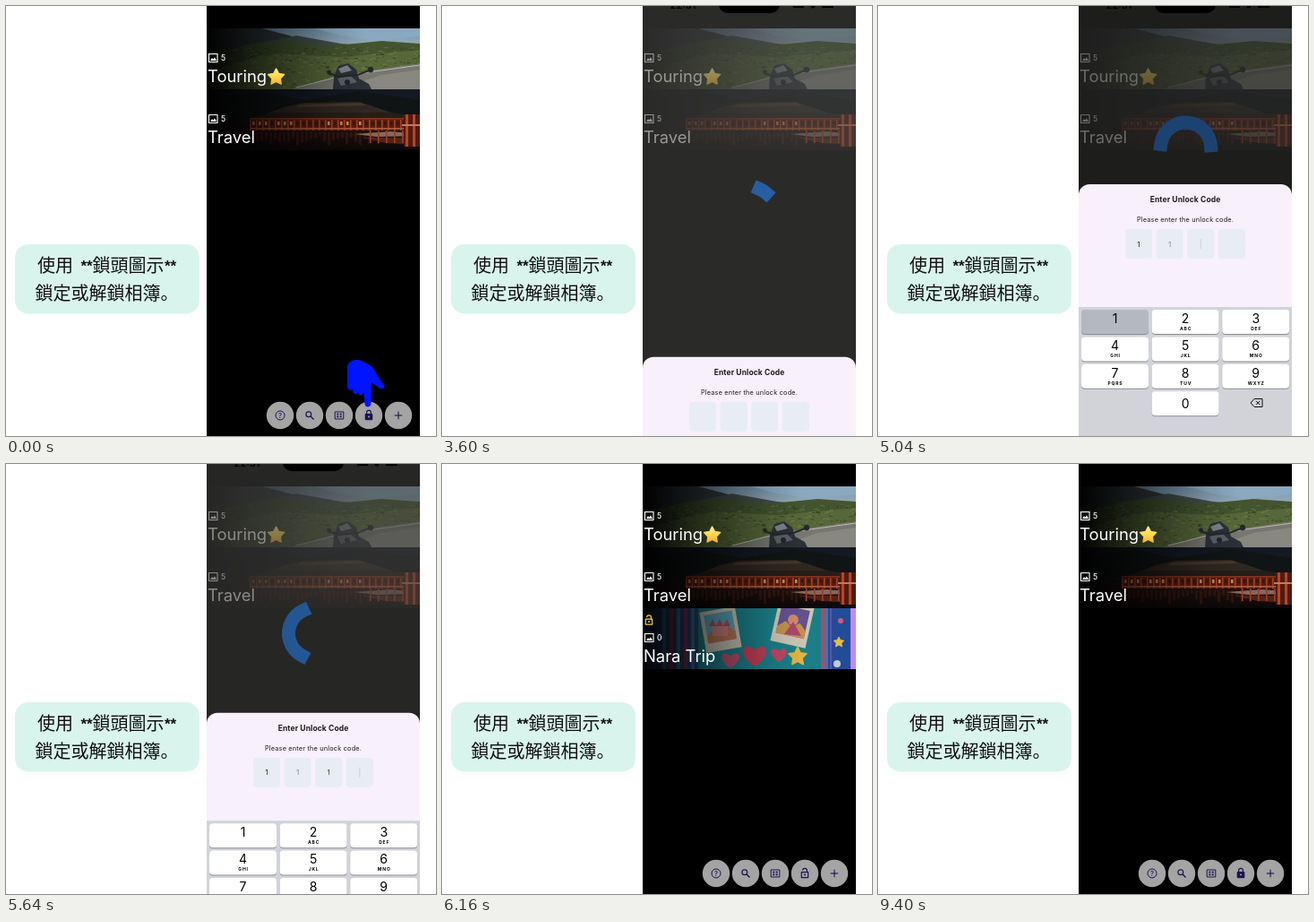
An HTML page with a canvas that plays this animation: 480x480 px, repeating every 9880 ms.

```html
<!DOCTYPE html>
<html lang="zh-Hant">
<head>
<meta charset="utf-8">
<title>Album lock</title>
<style>
html, body { margin: 0; width: 100%; height: 100%; overflow: hidden; background: #fff; }
canvas { display: block; width: 480px; height: 480px; }
</style>
</head>
<body>
<canvas id="stage" lang="ja" width="480" height="480"></canvas>
<script>
const ctx = document.getElementById('stage').getContext('2d');
const LOOP = 9880;
const UI = 'Inter, "Liberation Sans", sans-serif';
const CJK = '"Noto Sans CJK JP", "Noto Sans CJK SC", "Noto Sans CJK", sans-serif';
const L = 224, W = 238, ROW = 68, INK = '#1c1450';

const clamp = v => Math.max(0, Math.min(1, v));
const span = (t, from, len) => clamp((t - from) / len);

function fastOutSlowIn(x) {
  let lo = 0, hi = 1;
  for (let i = 0; i < 20; i++) {
    const m = (lo + hi) / 2, n = 1 - m;
    if (3 * n * n * m * 0.4 + 3 * n * m * m * 0.2 + m * m * m < x) lo = m; else hi = m;
  }
  return 3 * (1 - lo) * lo * lo + lo * lo * lo;
}

function random(seed) {
  return () => (seed = (seed * 16807) % 2147483647) / 2147483647;
}

function rect(c, x, y, w, h, color) {
  c.fillStyle = color;
  c.fillRect(x, y, w, h);
}

function round(c, x, y, w, h, r, color) {
  c.beginPath();
  c.roundRect(x, y, w, h, r);
  c.fillStyle = color;
  c.fill();
}

function disc(c, x, y, r, color) {
  c.beginPath();
  c.arc(x, y, r, 0, Math.PI * 2);
  c.fillStyle = color;
  c.fill();
}

function poly(c, color, ...p) {
  c.beginPath();
  for (let i = 0; i < p.length; i += 2) c.lineTo(p[i], p[i + 1]);
  c.closePath();
  c.fillStyle = color;
  c.fill();
}

function line(c, color, width, ...p) {
  c.beginPath();
  for (let i = 0; i < p.length; i += 2) c.lineTo(p[i], p[i + 1]);
  c.strokeStyle = color;
  c.lineWidth = width;
  c.stroke();
}

function text(str, x, y, font, color, align = 'left', spacing = 0) {
  ctx.font = font;
  ctx.fillStyle = color;
  ctx.textAlign = align;
  ctx.letterSpacing = spacing + 'px';
  ctx.fillText(str, x, y);
}

function star(c, x, y, r, color, inner = 0.5) {
  c.beginPath();
  for (let i = 0; i < 10; i++) {
    const a = i * Math.PI / 5 - Math.PI / 2, d = i % 2 ? r * inner : r;
    c.lineTo(x + d * Math.cos(a), y + d * Math.sin(a));
  }
  c.closePath();
  c.fillStyle = c.strokeStyle = color;
  c.lineJoin = 'round';
  c.lineWidth = r * 0.16;
  c.fill();
  c.stroke();
}

function heart(c, x, y, s, color) {
  c.beginPath();
  c.moveTo(x, y + s);
  c.bezierCurveTo(x - s * 2, y - s * 0.3, x - s * 0.8, y - s * 1.5, x, y - s * 0.5);
  c.bezierCurveTo(x + s * 0.8, y - s * 1.5, x + s * 2, y - s * 0.3, x, y + s);
  c.fillStyle = color;
  c.fill();
}

function fade(c, horizontal, stops) {
  const g = c.createLinearGradient(0, 0, horizontal ? W : 0, horizontal ? 0 : ROW);
  stops.forEach(([at, color]) => g.addColorStop(at, color));
  return g;
}

function photo(paint, shade) {
  const cv = document.createElement('canvas');
  cv.width = W;
  cv.height = ROW;
  const c = cv.getContext('2d');
  paint(c);
  rect(c, 0, 0, W, ROW, fade(c, true, shade));
  return cv;
}

function paintTouring(c) {
  const rnd = random(7);
  rect(c, 0, 0, W, ROW, fade(c, false, [[0, '#7596b0'], [0.35, '#9fb0ba']]));
  poly(c, '#8aa9c0', 120, 0, 238, 0, 238, 9, 190, 14, 150, 8);
  poly(c, '#343d41', 0, 0, 62, 0, 96, 9, 130, 17, 170, 22, 0, 34);
  poly(c, '#434f4a', 60, 16, 100, 8, 150, 17, 200, 22, 60, 30);
  poly(c, '#43552f', 0, 30, 50, 17, 90, 14, 130, 20, 165, 17, 195, 14, 238, 17, 238, 68, 0, 68);
  poly(c, '#566739', 0, 46, 80, 28, 150, 32, 238, 24, 238, 68, 0, 68);
  for (let i = 0; i < 420; i++) {
    const x = rnd() * W, y = 20 + rnd() * 46;
    rect(c, x, y, 1 + rnd() * 4, 1.2, rnd() < 0.5 ? 'rgba(28,44,20,.42)' : 'rgba(138,150,88,.35)');
  }
  poly(c, '#777770', 95, 68, 138, 56, 190, 46, 238, 39, 238, 68);
  poly(c, '#888780', 150, 68, 195, 52, 238, 46, 238, 68);
  line(c, '#b9b9af', 1, 100, 66, 150, 53, 238, 41);
  poly(c, '#2c3137', 141, 68, 142, 54, 147, 42, 158, 39, 167, 46, 170, 56, 181, 62, 184, 68);
  poly(c, '#7c858b', 147, 45, 157, 41, 162, 47, 150, 50);
  poly(c, '#596168', 146, 56, 160, 52, 168, 60, 150, 64);
  line(c, '#23282d', 2, 136, 50, 148, 54, 168, 52, 184, 46);
  disc(c, 136.5, 49, 2.4, '#23282d');
  disc(c, 183, 46, 3.2, '#23282d');
  disc(c, 157, 60, 3, '#20252a');
}

function paintTravel(c) {
  const rnd = random(23);
  rect(c, 0, 0, W, ROW, fade(c, false, [[0, '#131823'], [0.3, '#181b21'], [0.7, '#1b100d'], [1, '#0c0808']]));
  poly(c, '#101415', 0, 14, 60, 2, 110, 12, 170, 2, 238, 12, 238, 32, 0, 34);
  poly(c, '#2f2721', 66, 28, 86, 20, 108, 15, 170, 14, 186, 19, 212, 28);
  poly(c, '#463828', 104, 17, 172, 15, 178, 18, 100, 20);
  poly(c, '#261d18', 50, 32, 76, 26, 205, 26, 238, 30, 238, 34, 50, 36);
  rect(c, 48, 33, 190, 13, '#551d11');
  rect(c, 48, 32, 190, 1.5, '#843820');
  for (let x = 48; x < W; x += 7) {
    rect(c, x, 34, 1.6, 12, '#aa3d1f');
    rect(c, x + 3, 36, 2.5, 4, rnd() < 0.4 ? '#c98b5a' : '#35170f');
  }
  rect(c, 48, 43, 190, 1.6, '#b35d3c');
  for (let x = 20; x < 200; x += 5) rect(c, x, 48, 3, 3 + rnd() * 12, 'rgba(100,34,20,.35)');
  poly(c, '#84695b', 165, 50, 205, 47, 238, 50, 238, 52, 190, 53);
  poly(c, '#512317', 175, 54, 238, 54, 238, 62, 200, 60);
  for (let x = 182; x < W; x += 9) rect(c, x, 46, 1.6, 14, '#a03d23');
  rect(c, 220, 28, 18, 36, '#4c1d14');
  for (let x = 222; x < W; x += 8) rect(c, x, 28, 3, 36, '#bb4326');
  rect(c, 218, 39, 20, 2, '#c57a56');
}

function polaroid(c, x, y, angle, sky, land) {
  c.save();
  c.translate(x, y);
  c.rotate(angle);
  rect(c, -20, -23, 40, 46, '#c9c5b6');
  rect(c, -16, -19, 32, 32, sky);
  poly(c, land, -16, 13, -16, 5, -8, -2, 0, 3, 8, -3, 16, 4, 16, 13);
  c.restore();
}

function paintNara(c) {
  rect(c, 0, 0, W, ROW, '#176f7c');
  rect(c, 0, 0, 62, ROW, '#25446f');
  for (let i = 0; i < 5; i++) rect(c, 22 + i * 8, 0, 4, ROW, i % 2 ? '#7d3358' : '#3b6e9c');
  rect(c, 62, 0, 142, ROW, '#1b7e88');
  polaroid(c, 87, 24, -0.17, '#5ba5bd', '#b97752');
  rect(c, 78, 20, 17, 11, '#cf7f80');
  [78, 86, 94].forEach(x => poly(c, '#b84c5c', x - 4, 20, x, 12, x + 4, 20));
  polaroid(c, 167, 18, 0.22, '#62518f', '#c4914c');
  disc(c, 168, 13, 6, '#cf8a6d');
  poly(c, '#ad4767', 158, 29, 168, 15, 177, 31);
  heart(c, 125, 53, 12, '#c23d55');
  heart(c, 98, 58, 9, '#b9506f');
  heart(c, 152, 52, 8, '#c04664');
  star(c, 173, 54, 10.5, '#e3b340');
  rect(c, 199, 0, 4, ROW, '#bd4364');
  rect(c, 203, 0, 4, ROW, '#3778b0');
  rect(c, 207, 0, 25, ROW, '#234c98');
  rect(c, 209, 0, 2, ROW, '#704da5');
  star(c, 219, 38, 6, '#e8bd3f');
  disc(c, 221, 14, 3, '#d05a78');
  disc(c, 217, 62, 4, '#c1cad5');
  rect(c, 232, 0, 6, ROW, '#c58be8');
}

const darkLeft = [[0, 'rgba(0,0,0,.98)'], [0.2, 'rgba(0,0,0,.66)'], [0.6, 'rgba(0,0,0,.12)'], [0.75, 'rgba(0,0,0,0)']];
const touring = photo(paintTouring, darkLeft);
const travel = photo(paintTravel, darkLeft);
const nara = photo(paintNara, [[0, 'rgba(0,0,0,.95)'], [0.2, 'rgba(0,0,0,.62)'], [0.6, 'rgba(0,0,0,.1)'], [0.75, 'rgba(0,0,0,0)']]);

function padlock(x, y, color, open) {
  ctx.strokeStyle = color;
  ctx.lineWidth = 1.2;
  ctx.beginPath();
  if (open) ctx.moveTo(x - 2.4, y - 3.2);
  else ctx.moveTo(x - 2.4, y - 1);
  ctx.arc(x, y - 3.2, 2.4, Math.PI, 0);
  ctx.lineTo(x + 2.4, y - 1);
  ctx.stroke();
  if (open) {
    ctx.strokeRect(x - 3.7, y - 1.4, 7.4, 6);
  } else {
    round(ctx, x - 4.3, y - 2, 8.6, 7.2, 1, color);
  }
  disc(ctx, x, y + 1.6, 1, open ? color : '#a4a4a4');
}

function albumRow(img, top, title, count) {
  ctx.drawImage(img, L, top);
  ctx.strokeStyle = '#fff';
  ctx.lineWidth = 1.1;
  ctx.strokeRect(226.5, top + 28.5, 9.5, 9);
  poly(ctx, '#fff', 228, top + 36, 230, top + 33, 231.3, top + 34.6, 233, top + 32.2, 235, top + 36);
  text(count, 240, top + 36, '500 8.5px ' + UI, '#fff');
  text(title, 225, top + 60, '18.4px ' + UI, '#fff');
}

function buttons(y, unlocked) {
  for (let i = 0; i < 5; i++) disc(ctx, 306 + 33 * i, y, 15.2, '#a4a4a4');
  ctx.strokeStyle = INK;
  ctx.lineWidth = 1;
  ctx.beginPath();
  ctx.arc(306, y, 5, 0, 7);
  ctx.stroke();
  text('?', 306, y + 2.8, '500 7.5px ' + UI, INK, 'center');
  ctx.lineWidth = 1.2;
  ctx.beginPath();
  ctx.arc(337.8, y - 1.2, 2.9, 0, 7);
  ctx.stroke();
  line(ctx, INK, 1.4, 340, y + 1, 343.5, y + 4.5);
  ctx.lineWidth = 1;
  ctx.strokeRect(367.2, y - 4, 9.6, 8);
  for (const dx of [-2.7, 0.7]) for (const dy of [-2.3, 0.5]) rect(ctx, 372 + dx, y + dy, 2, 1.8, INK);
  ctx.globalAlpha = 1 - unlocked;
  padlock(405, y, INK, false);
  ctx.globalAlpha = unlocked;
  padlock(405, y, INK, true);
  ctx.globalAlpha = 1;
  line(ctx, INK, 1.1, 433.8, y, 442.2, y);
  line(ctx, INK, 1.1, 438, y - 4.2, 438, y + 4.2);
}

function home(buttonY, unlocked) {
  rect(ctx, L, 0, W, 480, '#000');
  albumRow(touring, 25, 'Touring', '5');
  const gold = ctx.createLinearGradient(0, 69, 0, 89);
  gold.addColorStop(0, '#fff0a0');
  gold.addColorStop(0.5, '#ffd84a');
  gold.addColorStop(1, '#f5a52c');
  star(ctx, 301.6, 79.5, 9.4, gold, 0.52);
  albumRow(travel, 93, 'Travel', '5');
  if (unlocked) {
    ctx.globalAlpha = unlocked;
    albumRow(nara, 161, 'Nara Trip', '0');
    padlock(231, 174.5, '#f5d033', true);
    ctx.globalAlpha = 1;
  }
  buttons(buttonY, unlocked);
}

function hand(scale) {
  ctx.save();
  ctx.translate(401.5, 421);
  ctx.scale(scale, scale);
  ctx.translate(-401.5, -421);
  ctx.beginPath();
  ctx.moveTo(381, 402);
  ctx.bezierCurveTo(383, 394, 394, 393, 401, 398);
  ctx.bezierCurveTo(409, 402, 412, 406, 414, 412);
  ctx.lineTo(422, 423);
  ctx.bezierCurveTo(424, 427, 419, 429, 416, 426);
  ctx.lineTo(408, 420);
  ctx.lineTo(407.5, 443);
  ctx.bezierCurveTo(407.5, 449, 400.5, 449, 400.3, 443);
  ctx.lineTo(399.5, 431);
  ctx.bezierCurveTo(398, 436, 393, 435, 393, 431);
  ctx.bezierCurveTo(391, 435, 386, 433, 387, 428);
  ctx.bezierCurveTo(383, 430, 380, 427, 381, 422);
  ctx.closePath();
  ctx.fillStyle = '#0014ff';
  ctx.fill();
  ctx.restore();
}

function spinner(t, cy) {
  const T = t < 4120 ? Math.max(0, t - 3500) : 620 + (t - 4120) * 1.066;
  const p = T / 1333 % 1;
  const head = fastOutSlowIn(clamp(p * 2)), tail = fastOutSlowIn(clamp(p * 2 - 1));
  const start = Math.PI * (-0.5 + tail * 1.5 + T / 2222 * 2 + p * 0.5);
  const sweep = Math.max(0.001, (head - tail) * 1.5 * Math.PI);
  ctx.beginPath();
  ctx.arc(343.5, cy, 28, start, start + sweep);
  ctx.lineCap = 'square';
  ctx.lineWidth = 15;
  ctx.strokeStyle = '#3d90f8';
  ctx.stroke();
  ctx.lineCap = 'butt';
}

function statusBar() {
  text('22:31', 269, 2.5, '600 11px ' + UI, '#000', 'center');
  round(ctx, 309, -12, 68, 20, 10, '#000');
  rect(ctx, 392, 0, 12, 2, '#000');
  disc(ctx, 414, 0, 2.5, '#000');
  rect(ctx, 424, 0, 13, 2, '#000');
}

const typedAt = [4520, 4800, 5080];
const digitAlpha = [1, 0.5, 0.85];

function sheet(t, top) {
  round(ctx, L, top, W, 500, [12, 12, 0, 0], '#f8f0fa');
  text('Enter Unlock Code', 343, top + 20, '700 8.5px ' + UI, '#1d1b20', 'center', 0.1);
  text('Please enter the unlock code.', 343, top + 42, '7.3px ' + UI, '#1d1b20', 'center', 0.2);
  const typed = typedAt.filter(at => t >= at).length;
  for (let i = 0; i < 4; i++) {
    const x = 276 + 34.6 * i;
    round(ctx, x, top + 50, 30, 33, 4, '#e8edf3');
    if (i < typed) {
      ctx.globalAlpha = digitAlpha[i];
      text('1', x + 15, top + 69.5, '8px ' + UI, '#1d1b20', 'center');
      ctx.globalAlpha = 1;
    } else if (i === typed && t > 3900) {
      rect(ctx, x + 14.6, top + 61, 0.8, 11, '#c3cad3');
    }
  }
}

const letters = ['', 'ABC', 'DEF', 'GHI', 'JKL', 'MNO', 'PQRS', 'TUV', 'WXYZ'];

function keyboard(t, top) {
  rect(ctx, L, top, W, 480, '#d1d3d9');
  for (let i = 0; i < 10; i++) {
    const col = i === 9 ? 1 : i % 3, row = Math.floor(i / 3);
    const x = 227 + 78.6 * col, y = top + 3 + 30.4 * row;
    const held = i === 0 && typedAt.concat(5360).some(at => t >= at - 40 && t < at + 80);
    round(ctx, x, y + 1, 75, 27, 4, '#8b8d92');
    round(ctx, x, y, 75, 27, 4, held ? '#b4b8c1' : '#fff');
    text(String((i + 1) % 10), x + 37.5, y + (i === 9 ? 18.5 : 14.8), '14px ' + UI, '#000', 'center');
    if (i < 9) text(letters[i], x + 38, y + 22.7, '700 5px ' + UI, '#000', 'center', 0.8);
  }
  const y = top + 107;
  ctx.beginPath();
  [[416, 0], [420, -4.5], [429, -4.5], [429, 4.5], [420, 4.5]].forEach(([px, dy]) => ctx.lineTo(px, y + dy));
  ctx.closePath();
  ctx.strokeStyle = '#111';
  ctx.lineWidth = 1;
  ctx.stroke();
  line(ctx, '#111', 1, 422, y - 2.2, 426.4, y + 2.2);
  line(ctx, '#111', 1, 426.4, y - 2.2, 422, y + 2.2);
}

function caption() {
  round(ctx, 10, 266, 206, 77.5, 15, '#d9f4ec');
  const cjk = '500 20px ' + CJK, stars = '700 17px "Liberation Sans", Arial, sans-serif';
  text('使用', 35, 297, cjk, '#111');
  text('**', 83.5, 296, stars, '#111');
  text('鎖頭圖示', 96.5, 297, cjk, '#111');
  text('**', 177, 296, stars, '#111');
  text('鎖定或解鎖相簿。', 32.5, 327.5, cjk, '#111');
}

function draw(t) {
  const loading = t >= 3480 && t < 6040;
  const rise = 1 - (1 - span(t, 3500, 250)) ** 2;
  const drop = span(t, 5580, 250);
  const keysUp = 1 - (1 - span(t, 3640, 460)) ** 3;
  const keysDown = 1 - (1 - span(t, 5560, 400)) ** 2.5;
  const keysTop = 480 - 144 * (keysUp - keysDown);
  const unlocked = t < 6040 ? 0 : 1 - span(t, 7760, 480);

  ctx.clearRect(0, 0, 480, 480);
  rect(ctx, 0, 0, 480, 480, '#fff');
  caption();

  ctx.save();
  ctx.beginPath();
  ctx.rect(L, 0, W, 480);
  ctx.clip();
  home(loading ? keysTop - 23 : 457, unlocked);
  if (loading) {
    rect(ctx, L, 0, W, 480, 'rgba(188,188,182,.34)');
    spinner(t, (keysTop - 20) / 2);
    rect(ctx, L, 0, W, 480, `rgba(0,0,0,${0.54 * rise * (1 - drop)})`);
    statusBar();
    if (drop < 1) sheet(t, keysTop - 137 + 137 * (1 - rise) + 137 * drop ** 1.5);
    if (keysTop < 480) keyboard(t, keysTop);
  }
  ctx.restore();

  if (t < 1960) hand(1 + 0.18 * Math.sin(Math.PI * span(t, 500, 960)));
}

function tick() {
  draw(performance.now() % LOOP);
  requestAnimationFrame(tick);
}
tick();
</script>
</body>
</html>
```
